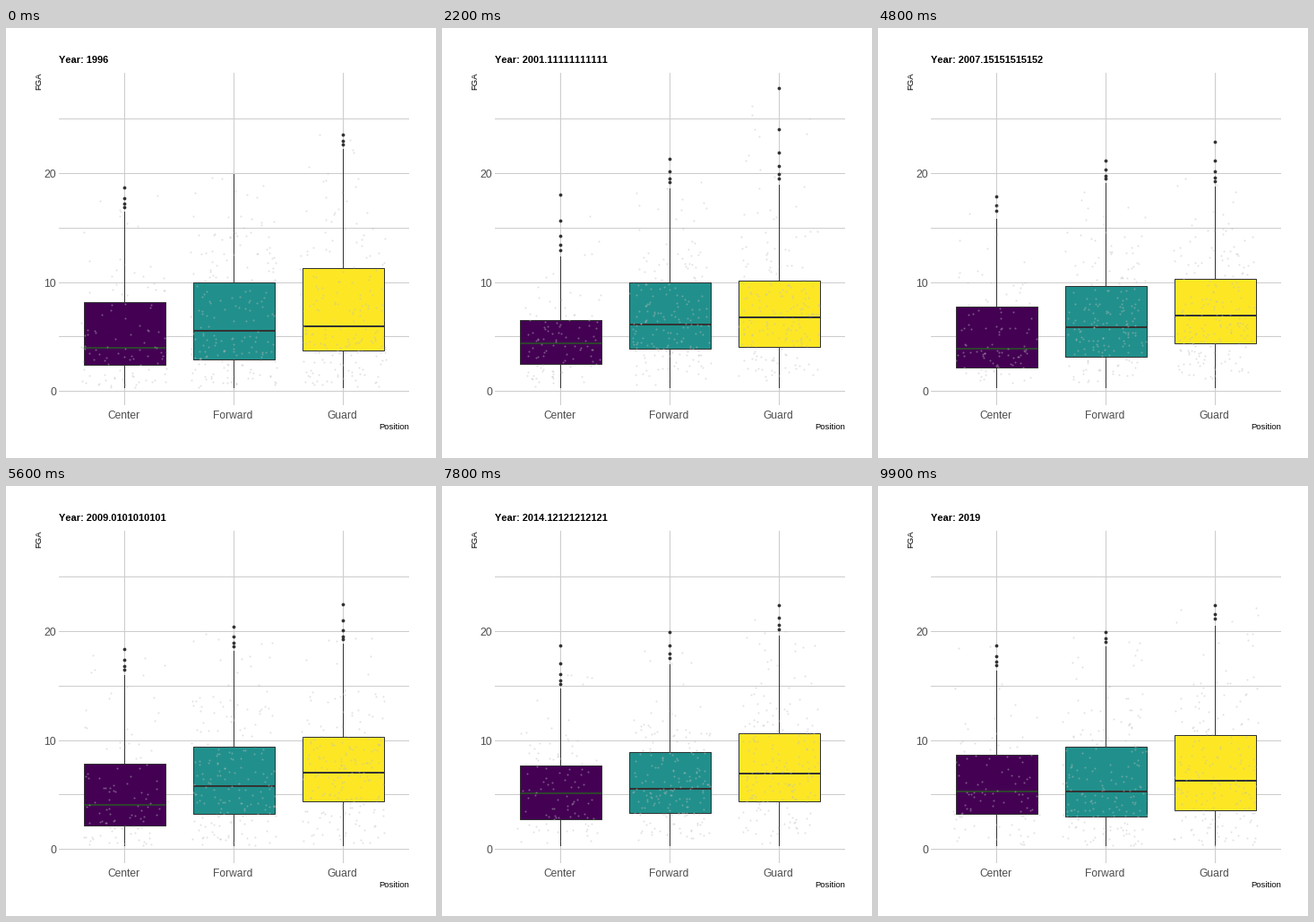
These frames come from a looping animation (480 px wide and 480 px high, 10 s). A matplotlib script:

```python
import numpy as np
import matplotlib.pyplot as plt
from matplotlib.animation import FuncAnimation
from matplotlib.patches import Rectangle

SIZE, DPI = 480, 100
PX = 72 / DPI
FRAMES, INTERVAL = 100, 100
FIRST, SPAN = 1996, 23
INK, GRID, GREY = "#333333", "#cccccc", "#4d4d4d"

# Elapsed years at which the quartiles are pinned
KEYS = np.array([0, 5.1, 8.6, 11.15, 14.9, 18.1, 23])


class Group:
    """One position: quartiles at the key years, and a peak (base, rise, year)."""

    def __init__(self, name, x, fill, median, count, q1, q2, q3, peak):
        self.name, self.x, self.fill, self.median = name, x, fill, median
        self.count, self.quartiles, self.peak = count, (q1, q2, q3), peak

    def stats(self, t):
        """Low, quartiles, high and top; whiskers stop at 1.5 box heights."""
        q1, q2, q3 = (np.interp(t, KEYS, q) for q in self.quartiles)
        base, rise, year = self.peak
        top = base + rise * np.exp(-((t - year) / 4) ** 2)
        high = min(top, .98 * (q3 + 1.5 * (q3 - q1)))
        return .3, q1, q2, q3, high, top

    def outliers(self, t):
        """Values thinning out from the whisker up to the top."""
        *_, high, top = self.stats(t)
        gaps = (top - high) * .58 ** np.arange(8)
        return high + gaps[gaps > .4]

    def points(self, t, rng):
        """Jittered observations spread like the box at time t."""
        low, q1, q2, q3, high, top = self.stats(t)
        value = np.interp(rng.random(self.count), [0, .25, .5, .75, .93, 1],
                          [low, q1, q2, q3, (q3 + high) / 2, top])
        x = self.x + rng.uniform(-48, 48, self.count)
        return np.column_stack([x, to_y(value)])


def to_y(value):
    return 405.1 - 12.15 * value


GROUPS = [
    Group("Center", 132, "#440154", "#2f422f", 105,
          [2.4, 2.45, 2.3, 2.15, 2.15, 2.75, 3.25],
          [4, 4.4, 4, 3.9, 4.35, 5.2, 5.3],
          [8.15, 6.5, 6, 7.75, 7.9, 7.65, 8.65], (18.7, -1.3, 8.5)),
    Group("Forward", 254, "#21908c", INK, 190,
          [2.9, 3.9, 2.95, 3.1, 3.3, 3.3, 3],
          [5.55, 6.15, 5.25, 5.9, 5.8, 5.55, 5.3],
          [9.95, 9.95, 9.65, 9.65, 9.05, 8.9, 9.4], (19.9, 2.4, 8)),
    Group("Guard", 376, "#fde725", INK, 195,
          [3.7, 4.05, 3.55, 4.4, 4.3, 4.4, 3.55],
          [6, 6.8, 6.8, 6.95, 7.2, 6.95, 6.3],
          [11.3, 10.15, 10.4, 10.3, 10.3, 10.65, 10.5], (22.4, 5.4, 5)),
]

rng = np.random.default_rng(FIRST)
YEARLY = [np.concatenate([g.points(t, rng) for g in GROUPS])
          for t in range(SPAN + 1)]

plt.rcParams["font.family"] = "Liberation Sans"
plt.rcParams["text.kerning_factor"] = 6  # no pair kerning
fig = plt.figure(figsize=(SIZE / DPI, SIZE / DPI), dpi=DPI, facecolor="white")
ax = fig.add_axes([0, 0, 1, 1])
ax.set(xlim=(0, SIZE), ylim=(SIZE, 0))
ax.axis("off")


def line(x, y, color, width=1, z=1):
    return ax.plot(x, y, color=color, lw=width * PX, zorder=z, snap=True,
                   solid_capstyle="projecting")[0]


def label(x, y, text, size, color="black", va="baseline", **kw):
    return ax.text(x, y, text, fontsize=size * PX, color=color, va=va, **kw)


def dots(diameter, color, z, **kw):
    return ax.scatter([], [], s=(diameter * PX) ** 2, color=color,
                      linewidths=0, zorder=z, **kw)


for v in range(0, 30, 5):
    line([59, 449], [to_y(v)] * 2, GRID)
    if v % 10 == 0:
        label(56, to_y(v) + 5, str(v), 12.2, GREY, ha="right")
label(450, 448.3, "Position", 9.5, ha="right")
label(41, 49, "FGA", 9.5, va="top", rotation=90, ha="right")
title = label(59, 39, "", 11, weight="bold")

parts = []
for g in GROUPS:
    line([g.x, g.x], [50, 420], GRID)
    label(g.x - .6, 436.5, g.name, 12, GREY, ha="center")
    box = Rectangle((g.x - 45, 0), 91, 0, fc=g.fill, ec=INK, lw=PX, zorder=3,
                    snap=True)
    ax.add_patch(box)
    parts.append((line([g.x, g.x], [0, 0], INK, z=2), box,
                  line([g.x - 44, g.x + 46], [0, 0], g.median, 2, 4)))
outlier_dots = dots(3.8, INK, 5)
jitter_dots = dots(2, "#bebebe", 6, alpha=.45)


def update(k):
    t = SPAN * k / (FRAMES - 1)
    title.set_text(f"Year: {FIRST + t:.15g}")
    marks = []
    for g, (whisker, box, median) in zip(GROUPS, parts):
        low, q1, q2, q3, high, _ = map(to_y, g.stats(t))
        whisker.set_ydata([low, high])
        box.set_y(q3)
        box.set_height(q1 - q3)
        median.set_ydata([q2 + .6] * 2)
        marks += [(g.x, to_y(v)) for v in g.outliers(t)]
    outlier_dots.set_offsets(np.reshape(marks, (-1, 2)))
    i = min(int(t), SPAN - 1)
    jitter_dots.set_offsets(YEARLY[i] + (YEARLY[i + 1] - YEARLY[i]) * (t - i))
    return []


anim = FuncAnimation(fig, update, frames=FRAMES, interval=INTERVAL,
                     repeat=True, repeat_delay=0)
plt.show()
```
